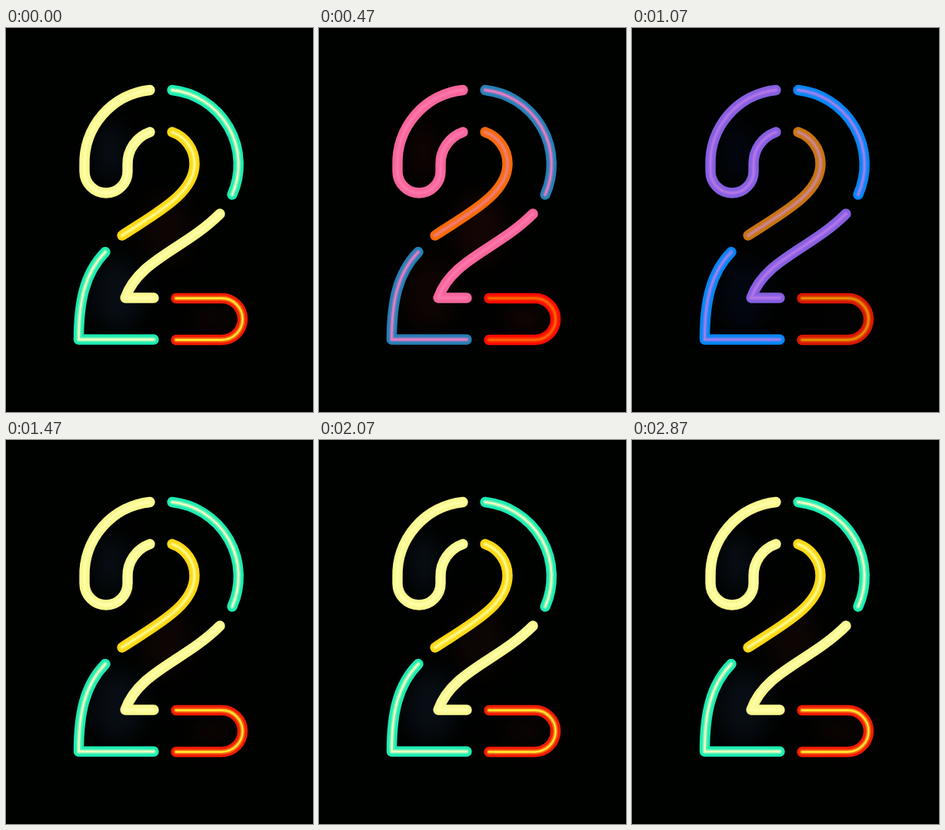
Animation of 399x498 px, one loop 2.94 s. Source, as an HTML page:

```html
<!DOCTYPE html>
<html lang="en">
<head>
<meta charset="utf-8">
<title>Neon two</title>
<style>
  html, body { margin: 0; width: 100%; height: 100%; overflow: hidden; background: #000200; }
  svg { display: block; width: 100%; height: 100%; animation: flicker 2940ms step-end infinite; }

  /* The sign returns to lemon between the pink and violet flashes */
  @keyframes flicker {
    0%, 22.78%, 45.23%, 70.4%, 92.85%, 100% {
      --wide: #f9f890; --wide-core: #ffffa8;
      --cool: #1cecb2; --cool-core: #e8ffc0;
      --warm: #fbd814; --warm-core: #fff884;
      --red: #f01c00; --red-core: #ffe030;
      --left-haze: #070d13; --mid-haze: #0c0503;
    }
    11.22%, 56.8% {
      --wide: #f5669c; --wide-core: #ff76aa;
      --cool: #2680b6; --cool-core: #e57cc4;
      --warm: #f86a08; --warm-core: #ee7c78;
      --red: #fa0c00; --red-core: #ff6200;
      --left-haze: #0e0403; --mid-haze: #120504;
    }
    36.39%, 79.25% {
      --wide: #8560e0; --wide-core: #b474ea;
      --cool: #0686f4; --cool-core: #9a80f0;
      --warm: #c87410; --warm-core: #cc8494;
      --red: #d81800; --red-core: #e68a00;
      --left-haze: #02060e; --mid-haze: #020301;
    }
  }

  .wide { --edge: var(--wide); --core: var(--wide-core); }
  .cool { --edge: var(--cool); --core: var(--cool-core); }
  .warm { --edge: var(--warm); --core: var(--warm-core); }
  .red  { --edge: var(--red);  --core: var(--red-core); }

  #sign { fill: none; stroke-linecap: round; stroke-linejoin: round; }
  .edge { stroke: var(--edge); stroke-width: 13.4; }
  .body { stroke: color-mix(in srgb, var(--edge), var(--core) 35%); stroke-width: 6.5; }
  .glow { stroke: var(--core); stroke-width: 2.8; stroke-linejoin: miter; }

  .haze { filter: blur(12px); fill: var(--mid-haze); }
  .haze .left { fill: var(--left-haze); }
</style>
</head>
<body>
<svg viewBox="0 0 399 498" preserveAspectRatio="none">
  <g class="haze">
    <ellipse class="left" cx="136" cy="160" rx="22" ry="38"/>
    <ellipse class="left" cx="145" cy="345" rx="34" ry="46"/>
    <ellipse cx="208" cy="260" rx="34" ry="44"/>
    <ellipse cx="268" cy="377" rx="28" ry="16"/>
  </g>
  <g id="sign"></g>
</svg>
<script>
const tubes = [
  ["wide", "M187 80.5A95 95 0 0 0 102 178V186A28 28 0 0 0 158 186V177A43.5 43.5 0 0 1 187 135"],
  ["wide", "M278 241C232 287 173 300 155 350H192"],
  ["cool", "M216 80.5A97 97 0 0 1 294 216"],
  ["cool", "M129 290.5C102 318 94.5 355 94.5 404H192"],
  ["warm", "M216 135A43.5 43.5 0 0 1 245 176C245 215 195 240 151 269"],
  ["red", "M221 350.5H280.5A27 27 0 0 1 280.5 404.5H221"]
];

// Every tube is three strokes: coloured edge, blended body, bright core
document.getElementById("sign").innerHTML = tubes.map(([kind, d]) =>
  `<g class="${kind}">` +
  ["edge", "body", "glow"].map(layer => `<path class="${layer}" d="${d}"/>`).join("") +
  "</g>").join("");
</script>
</body>
</html>
```
